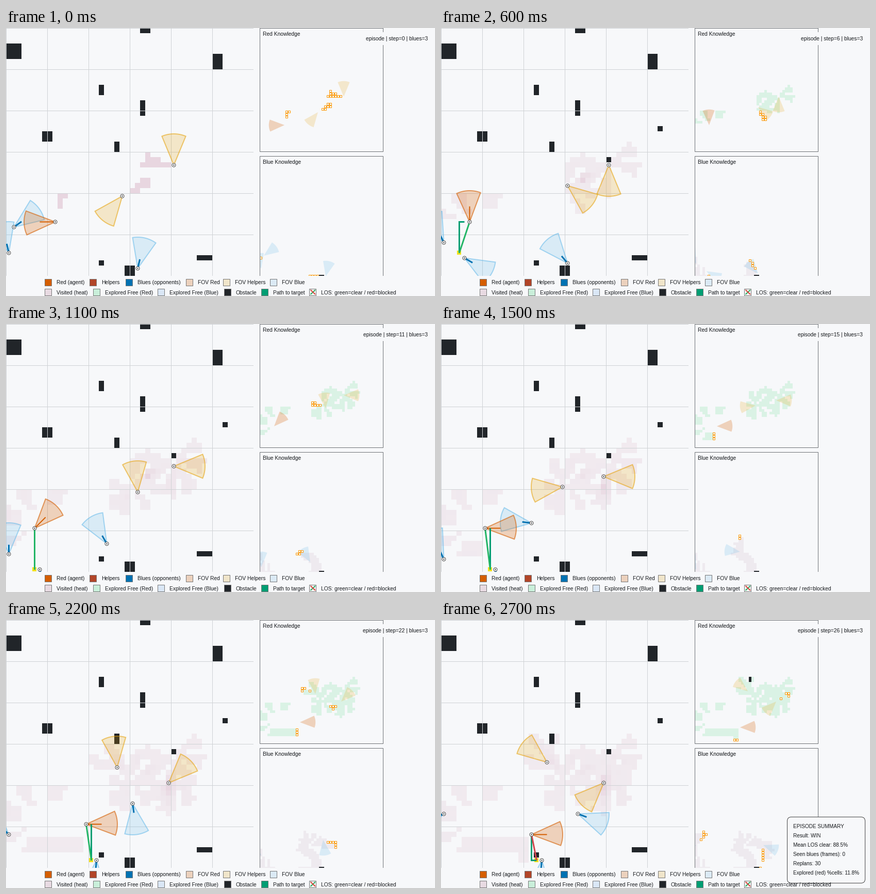
A matplotlib script for the animation above (2800 ms loop, 832x519 px).

```python
import math
import matplotlib.pyplot as plt
from matplotlib.animation import FuncAnimation
from matplotlib.collections import PolyCollection
from matplotlib.patches import Circle, FancyBboxPatch, Polygon, Rectangle
import numpy as np

plt.rcParams["path.snap"] = False

W, H, DPI = 832, 519, 100
PT = 72 / DPI
BG, INK = "#f7f8fa", "#212529"
RED, GOLD, BLUE, SKY = "#d55e00", "#e69f00", "#0072b2", "#56b4e9"
TEAL, ORANGE = "#009e73", "#ff9a0a"
HEAT = np.array([232, 214, 224]) / 255
LAST, SIZE = 26, 48
# Views: left, top, cell size
MAIN, TOP, BOTTOM = (0, 0, 10), (492, 0, 5), (492, 248, 5)

# Waypoints: step, column, row, heading in degrees clockwise from east
AGENT = [(0, 9, 37, -180), (2, 7, 37, -180), (3, 6, 37, -135), (4, 5, 37, -135),
         (6, 5, 37, -90), (8, 5, 39, -90), (11, 5, 39, -45), (12, 5, 39, 0),
         (15, 8, 39, 0), (24, 17, 39, 0), (26, 17, 41, 0)]
HELPER_A = [(0, 32, 26, -90), (2, 32, 26, -45), (3, 32, 26, 0), (5, 32, 26, 135),
            (6, 32, 26, 90), (11, 32, 27, 0), (15, 31, 29, 0), (19, 32, 30, 45),
            (22, 31, 31, -45), (26, 31, 31, -225)]
HELPER_B = [(0, 22, 32, 135), (3, 24, 30, 180), (6, 24, 30, 45), (11, 25, 32, -90),
            (15, 23, 31, -180), (19, 23, 30, -135), (22, 21, 28, -90),
            (25, 20, 27, -180), (26, 20, 27, -135)]
BLUE_A = [(0, 1, 38, -36), (5, 3, 43, 20), (6, 4, 44, 30), (10, 5, 47, 82),
          (15, 10, 47, 85), (19, 14, 46, 90), (22, 17, 46, 95), (25, 18, 46, 95),
          (26, 19, 46, 95)]
BLUE_B = [(0, 0, 43, -103), (6, 0, 41, -116), (11, 0, 44, -90), (15, 0, 45, -115),
          (19, 0, 44, -116), (22, 0, 41, -135), (26, 0, 37, -203)]
BLUE_C = [(0, 25, 46, -77), (6, 24, 45, -130), (11, 19, 42, -120),
          (15, 17, 38, -173), (19, 21, 37, -267), (22, 24, 35, -278),
          (26, 26, 37, -340)]

WALLS = [(26, 0, 2, 1), (0, 3, 3, 3), (40, 5, 2, 3), (18, 11, 1, 2),
         (26, 14, 1, 3), (7, 20, 2, 2), (21, 22, 1, 2), (37, 44, 3, 1),
         (18, 45, 1, 1), (23, 46, 2, 2)]
NEW_WALLS = [(42, 19, 1, 1), (32, 25, 1, 1)]
ROWS, COLS = np.mgrid[:SIZE, :SIZE]
solid = np.zeros((SIZE, SIZE), bool)
for c, r, w, h in WALLS:
    solid[r:r + h, c:c + w] = True


def pose(keys, step, lean=None):
    """Cell and heading; with a lean the heading snaps to eighths of a turn."""
    steps, *tracks = zip(*keys)
    c, r, a = (np.interp(step, steps, track) for track in tracks)
    if lean is not None:
        a = 45 * math.floor(a / 45 + 0.5) + lean
    return math.floor(c + 0.5), math.floor(r + 0.5), a


def red_team(step):
    return [pose(AGENT, step, -2), pose(HELPER_A, step, 0), pose(HELPER_B, step, -6.5)]


def blue_team(step):
    return [pose(keys, step) for keys in (BLUE_A, BLUE_B, BLUE_C)]


def sensed(c, r, heading):
    """Cells inside the narrow sensor wedge, which mirrors the heading."""
    dx, dy = COLS - c, ROWS - r
    reach = np.hypot(dx, dy)
    turn = np.degrees(np.arctan2(dy, dx)) - (102 - heading)
    turn = (turn + 180) % 360 - 180
    return (reach > 0) & (reach <= 6) & (abs(turn) <= 12.2)


def visits(team):
    """Running count of sightings, indexed by step, row and column."""
    return np.cumsum([sum(sensed(*who).astype(int) for who in team(s))
                      for s in range(LAST + 1)], axis=0)


RED_VISITS, BLUE_VISITS = visits(red_team), visits(blue_team)

fig = plt.figure(figsize=(W / DPI, H / DPI), dpi=DPI, facecolor=BG)
ax = fig.add_axes([0, 0, 1, 1])
ax.set_xlim(0, W)
ax.set_ylim(H, 0)
ax.axis("off")
live = []


def centre(cell, view=MAIN):
    x, y, s = view
    return x + (cell[0] + 0.5) * s + 0.5, y + (cell[1] + 0.5) * s + 0.5


def ray(p, angle, length):
    a = math.radians(angle)
    return p[0] + length * math.cos(a), p[1] + length * math.sin(a)


def box(x, y, w, h, color, z, edge="none"):
    return ax.add_patch(Rectangle((x, y), w, h, fc=color, ec=edge, lw=PT, zorder=z))


def block(b, color, z):
    return box(*(10 * v for v in b), color, z)


def line(points, color, lw, z):
    xs, ys = zip(*points)
    return ax.plot(xs, ys, color=color, lw=lw * PT, zorder=z,
                   solid_capstyle="butt", solid_joinstyle="miter")[0]


def text(x, y, s, size=10.3, ha="left"):
    return ax.text(x, y, s, family="Liberation Sans", fontsize=size * PT,
                   color="#15181b", ha=ha, va="baseline", zorder=20)


def cells(mask, view, colors, z):
    x, y, s = view
    quads = [[(x + (c + i) * s, y + (r + j) * s)
              for i, j in ((0, 0), (1, 0), (1, 1), (0, 1))]
             for r, c in np.argwhere(mask)]
    live.append(ax.add_collection(PolyCollection(
        quads, facecolors=colors, edgecolors="none", antialiaseds=False, zorder=z)))


def cone(who, view, color, alpha, z, edge=0):
    p = centre(who, view)
    pts = [p] + [ray(p, who[2] + a, 6.05 * view[2]) for a in np.linspace(-22.5, 22.5, 16)]
    fill = ax.add_patch(Polygon(pts, fc=color, ec="none", alpha=alpha, zorder=z))
    live.append(fill)
    if edge:
        live.append(ax.add_patch(Polygon(pts, fc="none", ec=color, lw=2 * PT,
                                         alpha=edge, zorder=z)))
    else:
        fill.set_clip_path(frames[view])


def pointer(who, heading, length, color, lw):
    p = centre(who)
    live.append(line([p, ray(p, heading, length)], color, lw, 8))


def marker(who):
    p = centre(who)
    live.append(ax.add_patch(Circle(p, 3.5, fc="white", ec="#4a4a4a", lw=PT, zorder=10)))
    live.append(ax.add_patch(Circle(p, 1.1, fc=INK, ec="none", zorder=10)))


def knowledge(count, step, view, color):
    """Explored cells, found walls and outlined cells that are new this step."""
    seen = count[step] > 0
    fresh = seen & (count[step - 1] == 0) if step else seen
    cells(seen & ~fresh & ~solid, view, color, 1)
    cells(seen & solid, view, INK, 6)
    x, y, s = view
    for r, c in np.argwhere(fresh & ~solid):
        live.append(box(x + c * s + 0.5, y + r * s + 0.5, s - 1, s - 1,
                        "#f0f5f6", 5, ORANGE))


def swatch(x, y, color, label):
    box(x + 0.5, y + 0.5, 13, 13, color, 20, "#777777")
    text(x + 23, y + 10.5, label)


# Fixed scenery
for wall in WALLS:
    block(wall, INK, 2)
for g in np.arange(0, 480, 80) + 0.5:
    line([(g, 0), (g, 480)], "#cfd2d5", 1, 3)
    line([(0, g), (480, g)], "#cfd2d5", 1, 3)
frames = {v: box(v[0] + 0.5, v[1] + 0.5, 239, 239, "none", 7, "#6f7276")
          for v in (TOP, BOTTOM)}
text(498, 15.3, "Red Knowledge")
text(498, 263.3, "Blue Knowledge")
box(684, 8, 144, 25, BG, 12)
box(0, 480, W, H - 480, BG, 12)

for x, color, label in [
        (75, RED, "Red (agent)"), (162, "#b24528", "Helpers"),
        (232, BLUE, "Blues (opponents)"), (349, "#ecd1bd", "FOV Red"),
        (421, "#f0e5ca", "FOV Helpers"), (512, "#dbeaf5", "FOV Blue")]:
    swatch(x, 486, color, label)
for x, color, label in [
        (75, "#e8dae2", "Visited (heat)"), (169, "#c9efda", "Explored Free (Red)"),
        (294, "#dae7f6", "Explored Free (Blue)"), (423, INK, "Obstacle"),
        (495, TEAL, "Path to target"),
        (588, "#f4f6f7", "LOS: green=clear / red=blocked")]:
    swatch(x, 505, color, label)
line([(590.5, 516), (600, 507)], "#27ae60", 2, 21)
line([(590.5, 507), (600, 516)], "#d9413a", 2, 21)


def heat(step):
    """Visited cells, tinted by their share of the highest count."""
    count = RED_VISITS[step]
    share = count[count > 0] / count.max()
    alpha = 0.4 + 0.6 * share ** 3
    colors = np.column_stack([np.tile(HEAT, (len(alpha), 1)), alpha])
    cells(count > 0, MAIN, colors, 1)


def chase(red, step):
    """Target cell, planned route and line of sight."""
    goal = pose(BLUE_A, step - 1)
    (x, y), (gx, gy) = centre(red), centre(goal)
    live.append(box(10 * goal[0] + 1, 10 * goal[1] + 1, 8, 8, "#f2e21d", 8))
    if step > 22:
        route = [(x, y), (x, gy), (gx, gy)]
    else:
        route = [(x + 10 * np.sign(gx - x), y), (gx, y), (gx, gy)]
    live.append(line(route, TEAL, 3, 8))
    sight = "#d0454c" if step == LAST else "#22b566"
    live.append(line([(x, y), (gx, gy)], sight, 3, 8))


def summary():
    live.append(ax.add_patch(FancyBboxPatch(
        (671.5, 381.5), 151, 128, boxstyle="round,pad=0,rounding_size=8",
        fc=BG, ec="#444444", lw=PT, zorder=15)))
    rows = ["EPISODE SUMMARY", "Result: WIN", "Mean LOS clear: 88.5%",
            "Seen blues (frames): 0", "Replans: 30", "Explored (red) %cells: 11.8%"]
    for i, row in enumerate(rows):
        live.append(text(683, 403 + 18 * i, row, 10))


def draw(i):
    while live:
        live.pop().remove()
    step = min(i, LAST)
    red, *helpers = red_team(step)
    blues = blue_team(step)

    heat(step)
    if step >= 3:
        live.extend(block(wall, INK, 2) for wall in NEW_WALLS)

    for who in blues:
        cone(who, MAIN, SKY, 0.18, 4, 0.5)
        cone(who, BOTTOM, SKY, 0.18, 4)
        pointer(who, who[2], 18, BLUE, 3)
    for who in helpers:
        cone(who, MAIN, GOLD, 0.2, 5, 0.55)
        cone(who, TOP, GOLD, 0.18, 4)
    cone(red, MAIN, RED, 0.25, 6, 0.6)
    cone(red, TOP, RED, 0.25, 4)
    pointer(red, red[2] + 2, 30, RED, 2)
    if step:
        chase(red, step)
    for who in [red] + helpers + blues:
        marker(who)

    knowledge(RED_VISITS, step, TOP, "#daf2e5")
    knowledge(BLUE_VISITS, step, BOTTOM, "#eeeaef")
    live.append(text(818, 24, f"episode | step={step} | blues=3", ha="right"))
    if i > LAST:
        summary()
    return live


anim = FuncAnimation(fig, draw, frames=LAST + 2, interval=100, repeat=True,
                     repeat_delay=0, init_func=lambda: live, blit=False)
plt.show()
```
